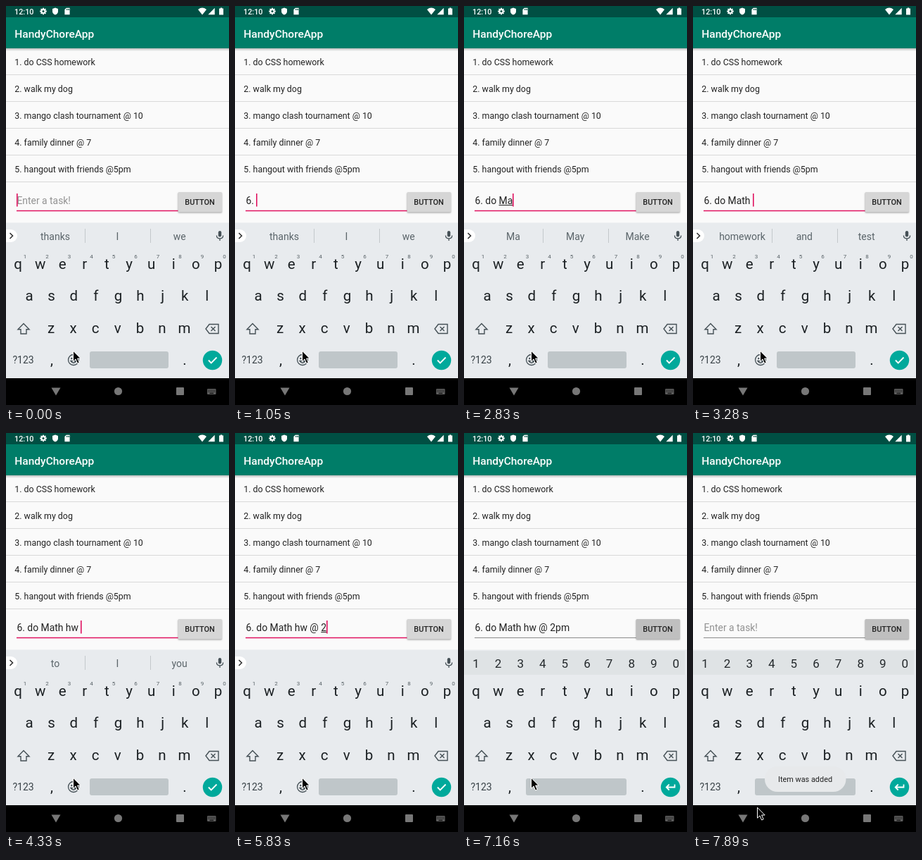
Animation, 317 px wide and 566 px high, one loop 8 s. Source, as an HTML page with a canvas:

```html
<!DOCTYPE html>
<html lang="en">
<head>
<meta charset="utf-8">
<title>Task list</title>
<style>
  html, body { margin: 0; width: 100%; height: 100%; overflow: hidden; background: #fafafa; }
  canvas { display: block; }
</style>
</head>
<body>
<canvas id="stage" width="317" height="566"></canvas>
<script>
const ctx = document.getElementById('stage').getContext('2d');
const LOOP = 8000;
const ACCENT = '#e0115f', KEYS = '#e8ebee', INK = '#222', ICON = '#455056', TEAL = '#00a99b';
const TASKS = ['1. do CSS homework', '2. walk my dog', '3. mango clash tournament @ 10',
  '4. family dinner @ 7', '5. hangout with friends @5pm'];

// Each state overrides the previous one. "word" is the underlined tail being composed.
const STEPS = [
  [0, { text: '', word: '', bar: 'thanks I we', caret: true, focus: true, numbers: false,
        button: '#d6d6d6', mouse: [95, 490], toast: 0 }],
  [300, { word: '6', bar: '' }],
  [750, { text: '6.', word: '', bar: 'thanks I we' }],
  [1050, { text: '6. ' }],
  [1490, { caret: false }],
  [1940, { word: 'd', caret: true }],
  [2090, { bar: 'd do day' }],
  [2240, { word: 'do', bar: "do don't does" }],
  [2380, { text: '6. do ', word: '', bar: 'you the it' }],
  [2530, { word: 'M', bar: 'M My Math' }],
  [2830, { word: 'Ma', bar: 'Ma May Make' }],
  [3130, { word: 'Math', bar: 'Math Maths Matches' }],
  [3280, { text: '6. do Math ', word: '', bar: 'homework and test' }],
  [3880, { word: 'h', bar: 'homework hw homeworks' }],
  [4030, { word: 'hw', bar: 'hw he hwy' }],
  [4330, { text: '6. do Math hw ', word: '', bar: 'to I you' }],
  [4780, { caret: false }],
  [5080, { text: '6. do Math hw @', bar: '', caret: true }],
  [5530, { text: '6. do Math hw @ ', bar: 'to I you' }],
  [5830, { word: '2', bar: '' }],
  [6430, { caret: false }],
  [6570, { word: '2p', caret: true }],
  [6870, { word: '2pm' }],
  [7020, { text: '6. do Math hw @ 2pm', word: '', focus: false, button: '#bfbfbf' }],
  [7160, { numbers: true }],
  [7450, { text: '', button: '#b4b4b4' }],
  [7600, { mouse: [95, 498], toast: .35 }],
  [7740, { mouse: [93, 518], toast: .8, button: '#bfbfbf' }],
  [7890, { mouse: [91, 532], toast: 1 }],
];

function stateAt(time) {
  return Object.assign({}, ...STEPS.filter(([start]) => start <= time).map(([, change]) => change));
}

function rect(x, y, w, h, color, radius = 0) {
  ctx.fillStyle = color;
  ctx.beginPath();
  ctx.roundRect(x, y, w, h, radius);
  ctx.fill();
}

function circle(x, y, r, color) {
  rect(x - r, y - r, 2 * r, 2 * r, color, r);
}

function label(text, x, y, size, color = INK, align = 'left', weight = 400) {
  ctx.font = `${weight} ${size}px Roboto, sans-serif`;
  ctx.textAlign = align;
  ctx.fillStyle = color;
  ctx.fillText(text, x, y);
  return ctx.measureText(text).width;
}

function shape(d, x, y, fill, stroke, width = 1.4) {
  ctx.save();
  ctx.translate(x, y);
  const path = new Path2D(d);
  if (fill) { ctx.fillStyle = fill; ctx.fill(path, 'evenodd'); }
  if (stroke) { ctx.strokeStyle = stroke; ctx.lineWidth = width; ctx.stroke(path); }
  ctx.restore();
}

function drawStatus() {
  rect(0, 0, 317, 16, '#004f43');
  label('12:10', 12, 11.5, 10.8, '#fff', 'left', 500);
  for (let i = 0; i < 4; i++) {
    ctx.save();
    ctx.translate(53, 7.5);
    ctx.rotate(i * Math.PI / 4);
    rect(-1, -4.8, 2, 9.6, '#fff');
    ctx.restore();
  }
  circle(53, 7.5, 3.5, '#fff');
  circle(53, 7.5, 1.5, '#004f43');
  shape('M0-5L4-3.4V0Q4 3.6 0 5Q-4 3.6-4 0V-3.4Z', 70, 7.5, '#fff');
  shape('M-1.2-4.8H3.6V4.8H-3.6V-2.4Z', 87, 7.5, '#fff');
  [-.5, 1.2, 2.7].forEach(x => rect(87 + x - .7, 4, .9, 2, '#004f43'));
  shape('M0 5L-6-2.6Q0-7.4 6-2.6Z', 279, 7.5, '#fff');
  shape('M4.7-4.7V4.7H-4.7Z', 292, 7.5, '#fff');
  shape('M-1.2-5H1.2V-4H3V5H-3V-4H-1.2Z', 306, 7.5, '#fff');
}

function drawList() {
  rect(0, 16, 317, 44, '#007d68');
  label('HandyChoreApp', 12.3, 44.5, 15.5, '#fff', 'left', 500);
  const shadow = ctx.createLinearGradient(0, 60, 0, 64);
  shadow.addColorStop(0, 'rgba(0,0,0,.25)');
  shadow.addColorStop(1, 'rgba(0,0,0,0)');
  rect(0, 60, 317, 4, shadow);
  TASKS.forEach((task, i) => {
    label(task, 12.3, 83.5 + 38 * i, 12.4);
    rect(0, 97 + 38 * i, 317, 1, '#d9d9d9');
  });
}

function drawForm({ text, word, caret, focus, button }) {
  const left = 15.4, base = 280.5;
  if (text + word) {
    const end = left + label(text + word, left, base, 13.9);
    if (word) {
      const width = ctx.measureText(word).width;
      rect(end - width, 282, width, 1, INK);
    }
    if (focus && caret) rect(Math.round(end), 266, 1.6, 18.5, ACCENT);
  } else {
    label('Enter a task!', left, base, 13.9, '#929292');
    if (focus && caret) rect(15, 266, 1.6, 18.5, ACCENT);
  }
  if (focus) rect(15, 289.7, 230, 1.6, ACCENT);
  else rect(15, 290, 230, 1, '#8b8b8b');
  ctx.save();
  ctx.shadowColor = 'rgba(0,0,0,.35)';
  ctx.shadowBlur = 2;
  ctx.shadowOffsetY = 1;
  rect(244.5, 264, 62.5, 28.5, button, 1.5);
  ctx.restore();
  label('BUTTON', 275.5, 282.2, 10.9, INK, 'center', 500);
}

function drawBar({ bar, numbers }) {
  if (numbers) {
    rect(0, 309, 314, 34, '#dfe3e5');
    [...'1234567890'].forEach((digit, i) => label(digit, 17 + 31.6 * i, 333, 17, '#24292c', 'center'));
    return;
  }
  rect(-9, 317, 25, 18, '#fff', 9);
  shape('M-2-4L2 0L-2 4', 7.5, 326, null, '#333', 1.6);
  if (bar) {
    bar.split(' ').forEach((word, i) => label(word, 70 + 88.3 * i, 331.5, 14, '#5b656a', 'center'));
    rect(112, 316, 1, 20, '#c3c8cb');
    rect(205, 316, 1, 20, '#c3c8cb');
  }
  rect(301.8, 319, 4.4, 8.5, ICON, 2.2);
  shape('M-4.6-1Q-4.6 3.4 0 3.4Q4.6 3.4 4.6-1M0 3.4V6.6', 304, 326.5, null, ICON, 1.3);
}

function drawKeyRow(letters, x, base) {
  [...letters].forEach((key, i) => label(key, x + 31.6 * i, base, 20.5, '#1b2023', 'center'));
}

function drawKeyboard(state) {
  rect(0, 307.5, 317, 220.5, KEYS);
  drawBar(state);
  drawKeyRow('qwertyuiop', 17, 372.5);
  drawKeyRow('asdfghjkl', 33, 418);
  drawKeyRow('zxcvbnm', 64, 464);
  if (!state.numbers) {
    [...'1234567890'].forEach((digit, i) => label(digit, 27 + 31.5 * i, 357.5, 8, '#566065', 'center'));
  }
  shape('M0-7.5L8 .7H4V7H-4V.7H-8Z', 25, 458, null, ICON);
  shape('M-9 0L-4-6.5H9V6.5H-4ZM-1.5-3L4.5 3M4.5-3L-1.5 3', 293, 458, null, ICON);
  label('?123', 9.5, 507, 14, '#394247');
  label(',', 65, 509, 20.5, '#1b2023', 'center');
  label('.', 254, 509, 20.5, '#1b2023', 'center');
  if (state.numbers) {
    rect(88, 490, 143, 24, '#bfc6c9', 3);
  } else {
    rect(119, 490, 112, 24, '#bfc6c9', 3);
    shape('M7.5 0A7.5 7.5 0 1 1-7.5 0A7.5 7.5 0 1 1 7.5 0M-4 1.5Q0 7 4 1.5Z', 96, 502, null, ICON, 1.3);
    circle(93.3, 500, 1.2, ICON);
    circle(98.7, 500, 1.2, ICON);
  }
  circle(293.5, 502.5, 13.7, TEAL);
  const enter = state.numbers ? 'M6-4V0H-5.5M-1.8-4L-5.8 0L-1.8 4' : 'M-5.6 0L-1.8 3.9L6-4';
  shape(enter, 293.5, 502.5, null, '#fff', 1.8);
}

function drawNavigation() {
  rect(0, 528, 317, 38, '#000');
  const gray = '#777';
  shape('M-6.5-5H6.5L0 6Z', 71, 546.5, gray);
  circle(159.5, 546.5, 5.6, gray);
  rect(242, 541, 11, 11, gray, 1);
  rect(286, 543, 12.5, 8, '#5d5d5d', 1);
  for (let i = 0; i < 10; i++) {
    rect(287.3 + 2.2 * (i % 5), 544.4 + 2.2 * Math.floor(i / 5), 1, 1, '#000');
  }
  rect(289.5, 548.8, 5.5, 1, '#000');
}

function drawToast(alpha) {
  ctx.save();
  ctx.globalAlpha = alpha;
  rect(102, 473, 115.5, 36, '#e7e9eb', 18);
  label('Item was added', 159.5, 494.6, 10.9, INK, 'center');
  ctx.restore();
}

function draw(time) {
  const state = stateAt(time);
  rect(0, 0, 317, 566, '#fafafa');
  drawStatus();
  drawList();
  drawForm(state);
  drawKeyboard(state);
  drawNavigation();
  drawToast(state.toast);
  shape('M.5-.8V14.2L4-.2L4 10.9L6.6 17L9.2 15.9L6.6 10H11.2Z'.replace('L4-.2', ''),
    ...state.mouse, '#000', '#fff', 1);
}

const start = performance.now();
function tick() {
  draw((performance.now() - start) % LOOP);
  requestAnimationFrame(tick);
}
tick();
</script>
</body>
</html>
```
